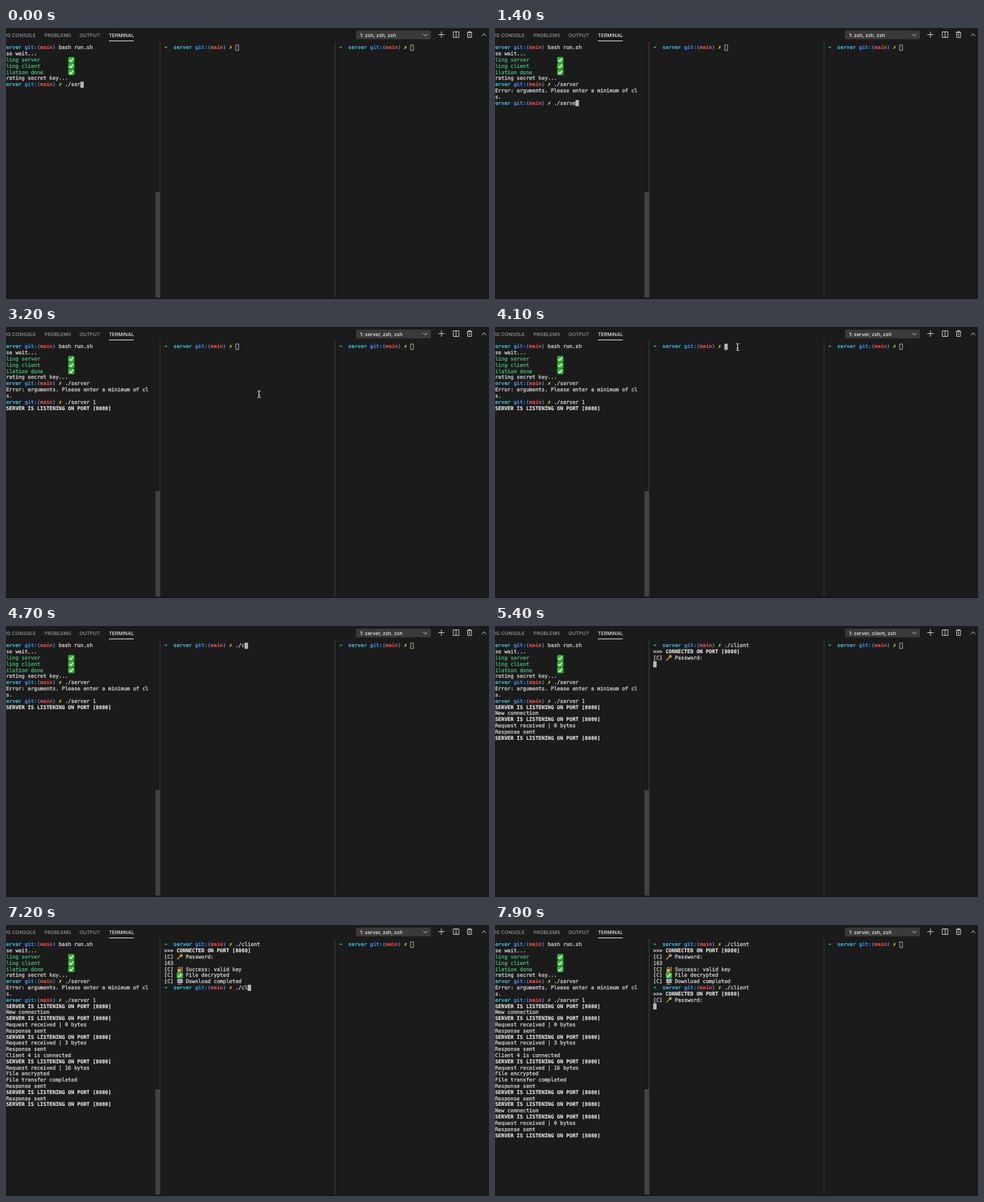
Animation, 690 px wide and 388 px high, one loop 8000 ms. Source, as an HTML page with a canvas:

```html
<!DOCTYPE html>
<html lang="en">
<head>
<meta charset="utf-8">
<title>Terminal session</title>
<style>
  html, body { margin: 0; width: 100%; height: 100%; overflow: hidden; background: #1b1b1b; }
  canvas { display: block; width: 690px; height: 388px; }
</style>
</head>
<body>
<canvas id="stage"></canvas>
<script>
const W = 690, H = 388, BOTTOM = 386, LOOP = 8000, TICK = 100;
const CELL = 4.42, ROW = 8.81, TOP = 23.6;
const LEFT = -17.5, MID = 226, RIGHT = 475.8;
const MONO = '"DejaVu Sans Mono", monospace';
const UI = 'Inter, "Liberation Sans", sans-serif';
const C = {
  bg: '#1b1b1b', text: '#d2d2d2', bright: '#ededed', green: '#45b574', arrow: '#2fc48d',
  cyan: '#3fb6d6', blue: '#3f8fe6', red: '#e2524f', yellow: '#f0ee48',
  dim: '#969696', ink: '#c8c8c8', line: '#404040', cursor: '#b8b8b8'
};
// Moments of the session, in ms.
const FAIL = 500, LISTENING = 2000, HOVER = 3200, FOCUS = 3900, HIDE = 4400,
  CONNECT = 5400, SUBMIT = 6100, DONE = 6200, QUIT = 6300, RECONNECT = 7900;

const canvas = document.getElementById('stage');
const ctx = canvas.getContext('2d');
const dpr = window.devicePixelRatio || 1;
canvas.width = W * dpr;
canvas.height = H * dpr;

const progress = (t, from, to) => Math.min(1, Math.max(0, (t - from) / (to - from)));
const mix = (a, b, p) => a + (b - a) * p;
// The part of a string typed so far, one character per gap.
const typed = (str, t, start, gap = TICK) =>
  str.slice(0, Math.max(0, Math.floor((t - start) / gap) + 1));

function rect(x, y, w, h, color) {
  ctx.fillStyle = color;
  ctx.fillRect(x, y, w, h);
}

function box(x, y, w, h, r, color) {
  ctx.fillStyle = color;
  ctx.beginPath();
  ctx.roundRect(x, y, w, h, r);
  ctx.fill();
}

function frame(x, y, w, h, color, width = 1) {
  ctx.strokeStyle = color;
  ctx.lineWidth = width;
  ctx.strokeRect(x, y, w, h);
}

function line(color, width, x, y, ...rest) {
  ctx.strokeStyle = color;
  ctx.lineWidth = width;
  ctx.beginPath();
  ctx.moveTo(x, y);
  for (let i = 0; i < rest.length; i += 2) ctx.lineTo(rest[i], rest[i + 1]);
  ctx.stroke();
}

function arc(color, width, x, y, r, from = 0, to = Math.PI * 2) {
  ctx.strokeStyle = color;
  ctx.lineWidth = width;
  ctx.beginPath();
  ctx.arc(x, y, r, from, to);
  ctx.stroke();
}

// Terminal text on the cell grid; a hairline outline gives the heavier smoothing.
function print(x, row, col, str, color = C.text, bold = false) {
  ctx.font = (bold ? 'bold ' : '') + '7.34px ' + MONO;
  ctx.fillStyle = ctx.strokeStyle = color;
  ctx.lineWidth = bold ? 0.1 : 0.28;
  const y = TOP + row * ROW + 6.8;
  [...str].forEach((ch, i) => {
    if (ch === ' ') return;
    ctx.fillText(ch, x + (col + i) * CELL, y);
    ctx.strokeText(ch, x + (col + i) * CELL, y);
  });
}

function prompt(x, row, command = '', dirty = true) {
  print(x, row, 0, '➜', C.arrow, true);
  print(x, row, 3, 'server', C.cyan, true);
  print(x, row, 10, 'git:(    )', C.blue, true);
  print(x, row, 15, 'main', C.red, true);
  if (dirty) print(x, row, 21, '✗', C.yellow, true);
  print(x, row, dirty ? 23 : 21, command);
}

function cursor(x, row, col, focused = true) {
  const cx = x + col * CELL, cy = TOP + row * ROW + 0.3;
  if (focused) rect(cx, cy, CELL + 0.4, ROW, C.cursor);
  else frame(cx + 0.6, cy + 0.4, CELL - 0.4, ROW - 0.9, C.ink, 0.8);
}

function commandLine(x, row, command, focused = true) {
  prompt(x, row, command);
  cursor(x, row, 23 + command.length, focused);
}

const icons = {
  check() {
    box(0.2, 0.3, 9, 8.4, 1.6, '#35b638');
    line('#fff', 1.3, 2.2, 4.8, 4, 6.7, 7.2, 2.3);
  },
  key() {
    line('#cfa545', 1.3, 1, 8, 6, 3);
    arc('#cfa545', 1.6, 6.8, 2.4, 1.3);
  },
  lock() {
    box(1.3, 4, 5.2, 4.6, 0.8, '#cfa94f');
    arc('#b9b9b9', 1, 3.9, 3.4, 1.7, Math.PI, 0);
    line('#c0a45a', 1.2, 8, 1, 8, 8);
  },
  computer() {
    box(1, 0.8, 7.8, 5.8, 0.6, '#b9bec2');
    rect(1.8, 1.6, 6.2, 4, '#9aa1a6');
    line('#c2c6c9', 1, 2, 8, 6.5, 8);
  }
};

function icon(name, x, row, col) {
  ctx.save();
  ctx.translate(x + col * CELL, TOP + row * ROW);
  icons[name]();
  ctx.restore();
}

function label(str, x, color, weight = 450, size = 7, align = 'left') {
  ctx.font = `${weight} ${size}px ${UI}`;
  ctx.fillStyle = color;
  ctx.textAlign = align;
  ctx.fillText(str, x, 12.5);
  ctx.textAlign = 'left';
}

const chevron = (x, y, d) => line(C.ink, 1, x - 3, y - d, x, y + d, x + 3, y - d);

function header(t) {
  label('DEBUG CONSOLE', 42.5, C.dim, 450, 7, 'right');
  label('PROBLEMS', 55, C.dim);
  label('OUTPUT', 105, C.dim);
  label('TERMINAL', 147, '#e7e7e7', 550);
  rect(147, 18, 35.5, 1, '#dedede');

  const server = t < LISTENING ? 'zsh' : 'server';
  const client = t >= CONNECT && t < QUIT ? 'client' : 'zsh';
  box(500, 3.7, 107, 12.6, 1, '#3a3a3a');
  label(`1: ${server}, ${client}, zsh`, 505.8, '#f0f0f0', 500, 7.15);
  chevron(599, 10, 1.5);

  line(C.ink, 1, 617.5, 9.5, 626.5, 9.5);
  line(C.ink, 1, 622, 5, 622, 14);
  frame(639, 5.5, 8, 8, C.ink);
  line(C.ink, 1, 643, 5.5, 643, 13.5);
  frame(659.5, 6.5, 5.5, 7, C.ink);
  line(C.ink, 1, 658.5, 6.2, 666, 6.2);
  line(C.ink, 1.4, 660.8, 5.4, 663.7, 5.4);
  line(C.ink, 1, 662.2, 8, 662.2, 12);
  chevron(683, 9.8, -1.7);
}

const LISTEN = '>>> SERVER IS LISTENING ON PORT [8080]';
const SENT = '[S] Response sent';
const request = n => `[S] Request received | ${n} bytes`;
const JOIN = ['[S] New connection', LISTEN, request(0), SENT, LISTEN];
const TRANSFER = [
  request(3), SENT, '[S] Client 4 is connected', LISTEN,
  request(16), '[S] File encrypted', '[S] File transfer completed', SENT, LISTEN, SENT, LISTEN
];

function serverLog(t) {
  const lines = [];
  if (t >= LISTENING) lines.push(LISTEN);
  if (t >= CONNECT) lines.push(...JOIN);
  if (t >= DONE) lines.push(...TRANSFER);
  if (t >= RECONNECT) lines.push(...JOIN);
  return lines;
}

function leftPane(t) {
  ctx.save();
  ctx.beginPath();
  ctx.rect(0, 20, 213, BOTTOM - 20);
  ctx.clip();
  prompt(LEFT, 0, 'bash run.sh', false);
  print(LEFT, 1, 0, 'Please wait...');
  ['Compling server', 'Compling client', 'Compilation done'].forEach((s, i) => {
    print(LEFT, 2 + i, 0, s, C.green);
    icon('check', LEFT, 2 + i, 24);
  });
  print(LEFT, 5, 0, 'Generating secret key...');

  if (t < FAIL) {
    commandLine(LEFT, 6, './ser');
  } else {
    const command = typed('./server 1', t, 800);
    prompt(LEFT, 6, './server');
    print(LEFT, 7, 0, '[S] Error: arguments. Please enter a minimum of cl');
    print(LEFT, 8, 0, 'ients.');
    if (t < LISTENING) commandLine(LEFT, 9, command);
    else prompt(LEFT, 9, command);
  }
  serverLog(t).forEach((s, i) => {
    const bold = s === LISTEN;
    print(LEFT, 10 + i, 0, s, bold ? C.bright : C.text, bold);
  });
  ctx.restore();
}

function note(row, name, str) {
  print(MID, row, 0, '[C]');
  icon(name, MID, row, 4);
  print(MID, row, 7, str);
}

function connected(row) {
  print(MID, row, 0, '>>> CONNECTED ON PORT [8080]', C.bright, true);
  note(row + 1, 'key', 'Password:');
}

function middlePane(t) {
  const run = './client';
  if (t < CONNECT) return commandLine(MID, 0, typed(run, t, 4500, 85), t >= FOCUS);

  const password = t < SUBMIT ? typed('16', t, 5700) : '163';
  prompt(MID, 0, run);
  connected(1);
  print(MID, 3, 0, password);
  if (t < DONE) return cursor(MID, 3, password.length);

  note(4, 'lock', 'Success: valid key');
  note(5, 'check', 'File decrypted');
  note(6, 'computer', 'Download completed');
  if (t < QUIT) return cursor(MID, 7, 0);
  if (t < RECONNECT) return commandLine(MID, 7, typed(run, t, 6900));

  prompt(MID, 7, run);
  connected(8);
  cursor(MID, 10, 0);
}

// The pointer sweeps up to the prompt, then drifts right along it.
function pointer(t) {
  if (t < HOVER || t >= HIDE) return;
  const up = progress(t, HOVER, HOVER + 300) ** 1.5;
  const along = progress(t, 3700, 4200);
  const x = mix(361.5, 325, up) + 27 * along;
  const y = mix(96.3, 28.7, up);
  const color = '#e2e2e2';
  line(color, 1, x, y - 4, x, y + 4);
  line(color, 1, x - 1.3, y + 1.5, x + 1.3, y + 1.5);
  for (const d of [-1, 1]) line(color, 1, x - 2.5, y + 5 * d, x, y + 4.3 * d, x + 2.5, y + 5 * d);
}

function draw(t) {
  ctx.setTransform(dpr, 0, 0, dpr, 0, 0);
  ctx.textRendering = 'geometricPrecision';
  ctx.lineJoin = 'round';
  rect(0, 0, W, H, C.bg);
  header(t);
  leftPane(t);
  middlePane(t);
  commandLine(RIGHT, 0, '', false);
  for (const x of [219.5, 469.5]) rect(x, 20, 1, BOTTOM - 20, C.line);
  rect(213.5, 235, 6.5, BOTTOM - 235, '#424242');
  rect(0, BOTTOM, W, H - BOTTOM, '#161616');
  pointer(t);
}

let start = null;
function tick(now) {
  if (start === null) start = now;
  const t = (now - start) % LOOP;
  draw(Math.floor(t / TICK) * TICK);
  requestAnimationFrame(tick);
}
draw(0);
requestAnimationFrame(tick);
</script>
</body>
</html>
```
